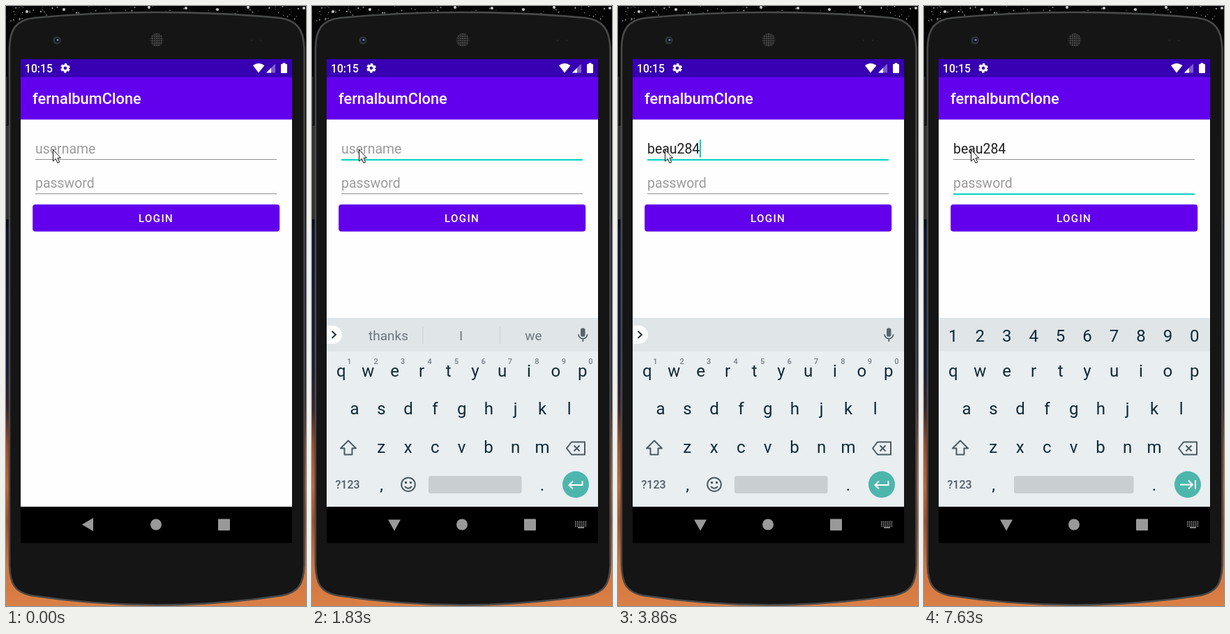
An HTML page that plays this animation: 430 px wide and 858 px high, repeating every 8 s.

```html
<!DOCTYPE html>
<html lang="en">
<head>
<meta charset="utf-8">
<title>Login screen</title>
<style>
  html, body { margin: 0; width: 100%; height: 100%; overflow: hidden; background: #000; }
  svg { display: block; width: 430px; height: 858px; font-family: Roboto, "Noto Sans", sans-serif; }
  text { white-space: pre; }
  .mid { text-anchor: middle; }
  .field { font-size: 19.46px; }
  .hint { fill: #9b9b9b; }
  .typed { fill: #1f1f1f; }
  .key { font-size: 24px; fill: #102a36; }
  .sup { font-size: 11px; font-weight: 500; fill: #75828a; }
  .pick { font-size: 19px; fill: #6a777e; }
  .pick.strong { font-weight: 700; fill: #000; }
  .line { fill: none; stroke: #4b5a62; stroke-width: 2; }
  .soft { fill: #999; }
  .off { display: none; }
</style>
</head>
<body>
<svg viewBox="0 0 430 858">
  <defs>
    <linearGradient id="sky" x2="0" y2="1">
      <stop offset="0" stop-color="#050506"/>
      <stop offset=".35" stop-color="#06070c"/>
      <stop offset=".38" stop-color="#0a1238"/>
      <stop offset=".6" stop-color="#141a3c"/>
      <stop offset=".67" stop-color="#3a2028"/>
      <stop offset=".73" stop-color="#a04a24"/>
      <stop offset=".8" stop-color="#c9642f"/>
      <stop offset=".86" stop-color="#a84c22"/>
      <stop offset=".93" stop-color="#d5733a"/>
      <stop offset="1" stop-color="#d98046"/>
    </linearGradient>
    <pattern id="mesh" width="3.2" height="3.2" patternUnits="userSpaceOnUse">
      <rect width="3.2" height="3.2" fill="#1b1b1b"/>
      <circle cx="1.6" cy="1.6" r="1.1" fill="#555"/>
    </pattern>
  </defs>

  <rect width="430" height="858" fill="url(#sky)"/>
  <g id="stars"></g>

  <!-- phone -->
  <path d="M0 171h4v134h-4z" fill="#303030"/>
  <path d="M0 101h2v69h-2z" fill="#242424"/>
  <path d="M5 60C5.500 34 14 20 40 17Q125 9 216 9T392 17C417 20 426.500 34 427.500 60V800C426.500 826 420 838 396 843Q306 856.500 216 856.500T36 843C12 838 6 826 5 800Z" fill="#151515" stroke="#484949" stroke-width="2.600"/>
  <circle cx="73" cy="49" r="5.500" fill="#38393d"/>
  <circle cx="73.500" cy="49" r="3.500" fill="#11131d"/>
  <circle cx="74" cy="48.500" r="1.600" fill="#7883a8"/>
  <circle cx="216" cy="48.500" r="9.500" fill="url(#mesh)"/>
  <path d="M351 48h2v2h-2zM364 48h2v2h-2z" fill="#242424"/>

  <!-- screen -->
  <rect x="21" y="76" width="389" height="692" fill="#fefefe"/>
  <rect x="21" y="101" width="389" height="61.400" fill="#6200ee"/>
  <rect x="21" y="76" width="389" height="25.700" fill="#3700b3"/>
  <text x="27" y="94.600" font-size="15.700" font-weight="500" fill="#fff">10:15</text>
  <g fill="none" stroke="#fff">
    <circle cx="85" cy="88.800" r="3.800" stroke-width="3"/>
    <circle cx="85" cy="88.800" r="5.700" stroke-width="2.200" stroke-dasharray="3.400 2.569" stroke-dashoffset="4.700"/>
  </g>
  <path d="M354 85Q362 79 370.500 85L362 95.500Z" fill="#fff"/>
  <path d="M386 82.500V95.500H373Z" fill="#7f5cce"/>
  <path d="M380 88.500V95.500H373Z" fill="#fff"/>
  <path d="M396.500 81.500h4v1.500h1.500q1 0 1 1v11q0 1-1 1h-7q-1 0-1-1v-11q0-1 1-1h1.500z" fill="#fff"/>
  <text x="38" y="140" font-size="21.800" font-weight="500" fill="#fff">fernalbumClone</text>

  <!-- form -->
  <text id="userHint" class="field hint" x="42" y="211">username</text>
  <text id="typed" class="field typed" x="42" y="211"></text>
  <rect id="spell" x="42" y="213" height="1" fill="#333"/>
  <rect id="caret" y="191" width="2" height="25.500" fill="#03cfbd"/>
  <rect id="userLine" x="42" y="219" width="346"/>
  <text class="field hint" x="42" y="260">password</text>
  <rect id="passLine" x="42" y="268" width="346"/>
  <rect x="38.200" y="283.700" width="354" height="38.900" rx="4" fill="#6200ee"/>
  <text x="190" y="308.600" font-size="15.100" font-weight="500" letter-spacing="1.350" fill="#fff">LOGIN</text>

  <!-- navigation bar -->
  <rect x="21" y="716" width="389" height="52" fill="#000"/>
  <path id="back" class="soft" d="M109 741.500L125 732V751Z"/>
  <g id="hide" class="soft">
    <path d="M109 734.500H127L118 750.500Z"/>
    <g id="hideKeys"></g>
    <path d="M381 745h9v1.700h-9z"/>
  </g>
  <circle class="soft" cx="215" cy="741.500" r="8"/>
  <rect class="soft" x="304" y="733.500" width="17" height="16.500" rx="1"/>

  <!-- keyboard -->
  <g id="board">
    <rect x="21" y="446" width="389" height="270" fill="#e9eef1"/>
    <rect x="21" y="446" width="389" height="48" fill="#e0e5e8"/>
    <g id="keys"></g>
    <g class="line">
      <path d="M52 621.500L41 632.500H46.500V641.500H57.500V632.500H63Z" stroke-linejoin="round"/>
      <path d="M372 623.500H391V641.500H372L365 632.500Z" stroke-linejoin="round"/>
      <path d="M375.500 628.500l8 8m0-8l-8 8"/>
    </g>
    <text x="33.500" y="690" font-size="16" font-weight="500" fill="#4f5d65">?123</text>
    <rect id="space" y="672" height="25" rx="3" fill="#c9ced1"/>
    <circle cx="378" cy="684.200" r="19" fill="#4db6ac"/>
    <g id="wordTools">
      <path d="M21 457H30A13 13 0 0 1 30 483H21Z" fill="#fff"/>
      <path class="line" d="M28.500 465l5.500 5-5.500 5" style="stroke:#263238"/>
      <rect x="385" y="460.500" width="6.500" height="12.500" rx="3.250" fill="#56646c"/>
      <path class="line" d="M382 469.500a6.300 6.300 0 0 0 12.600 0M388.300 476v4" style="stroke-width:1.700"/>
      <g id="supers"></g>
      <g class="line">
        <circle cx="138" cy="684.200" r="9.800"/>
        <path d="M133 687q5 5.500 10 0"/>
      </g>
      <path d="M133 680h3v3h-3zM140 680h3v3h-3z" fill="#4b5a62"/>
      <path class="line" d="M387.500 679v6H369M374 679.500l-5.500 5.500 5.500 5.500" style="stroke:#fff"/>
    </g>
    <g id="picks">
      <path id="bars" d="M158.500 458h1v25h-1zM269 458h1v25h-1z" fill="#cbd1d4"/>
      <text class="pick mid" x="109.500" y="478"></text>
      <text class="pick mid" x="213.700" y="478"></text>
      <text class="pick mid" x="317.500" y="478"></text>
    </g>
    <g id="digits">
      <path class="line" d="M367 684.500h17M379 678.500l6 6-6 6M389 678v13" style="stroke:#fff"/>
    </g>
  </g>

  <path d="M67.500 205.500V222L71.300 218.500 74 224.500 76.600 223.300 74 217.300H78.500Z" fill="#fff" stroke="#111"/>
</svg>
<script>
const LOOP = 8000, STEP = 38.45;
const $ = id => document.getElementById(id);

function add(parent, tag, attrs, text = '') {
  const el = document.createElementNS('http://www.w3.org/2000/svg', tag);
  for (const k in attrs) el.setAttribute(k, attrs[k]);
  el.textContent = text;
  return parent.appendChild(el);
}

function row(parent, chars, x, y, cls = 'key mid') {
  [...chars].forEach((c, i) => add(parent, 'text', { class: cls, x: x + i * STEP, y }, c));
}

row($('keys'), 'qwertyuiop', 41.8, 530);
row($('keys'), 'asdfghjkl', 61, 584);
row($('keys'), 'zxcvbnm', 99.3, 639);
row($('keys'), ',', 99.7, 693);
row($('keys'), '.', 330, 693);
row($('supers'), '1234567890', 53.3, 512, 'sup mid');
row($('digits'), '1234567890', 41.8, 479.5);

for (let i = 0; i < 18; i++)
  add($('hideKeys'), 'rect', { x: 377 + i % 6 * 2.9, y: 737 + Math.floor(i / 6) * 2.9, width: 1.7, height: 1.7 });

let seed = 7;
const rnd = () => (seed = seed * 16807 % 2147483647) / 2147483647;
const star = (cx, cy, r, fill) => add($('stars'), 'circle', { cx, cy, r, fill });
for (let i = 0; i < 150; i++) {
  const g = 50 + Math.floor(rnd() * 130);
  star(rnd() * 430, rnd() * 26, 0.4 + rnd() * 0.8, `rgb(${g},${g},${g})`);
}
for (const [x, y] of [[83, 5], [205, 2], [258, 3], [30, 8], [303, 5], [347, 2], [427, 3]]) star(x, y, 2.1, '#c4c4c4');

// Each cue changes only the listed parts of the state.
const cues = [
  [0, { text: '', caret: 0, focus: '', nav: 0, board: '', picks: ['thanks', 'I', 'we'], strong: 0, spell: 0, digits: 0 }],
  [410, { focus: 'user' }],
  [550, { caret: 1 }],
  [930, { caret: 0, nav: 1 }],
  [1180, { board: 'rising' }],
  [1300, { board: 'up', caret: 1 }],
  [1830, { caret: 0 }],
  [1980, { text: 'b', caret: 1, spell: 1, picks: ['be', 'but', 'because'], strong: 1 }],
  [2100, { text: 'be', picks: ['been', 'be', 'beautiful'] }],
  [2220, { text: 'bea', picks: ['bea', 'bear', 'bearing'] }],
  [2500, { text: 'beau', picks: ['beau', 'Beau', "Beau's"] }],
  [2900, { caret: 0 }],
  [3460, { text: 'beau2', caret: 1, picks: ['', 'beau2', ''], strong: 0 }],
  [3610, { text: 'beau28', picks: ['', 'beau28', ''] }],
  [3860, { text: 'beau284', picks: [], spell: 0 }],
  [4390, { caret: 0 }],
  [4790, { caret: 1 }],
  [5320, { caret: 0 }],
  [5850, { caret: 1 }],
  [6410, { caret: 0 }],
  [6840, { caret: 1 }],
  [7510, { caret: 0, focus: 'pass' }],
  [7630, { digits: 1 }]
];

const show = (id, on) => $(id).classList.toggle('off', !on);
const set = (id, attrs) => { for (const k in attrs) $(id).setAttribute(k, attrs[k]); };
const underline = (id, on) => set(id, on ? { height: 2, fill: '#03d3c0' } : { height: 1, fill: '#909090' });

function draw(s) {
  $('typed').textContent = s.text;
  const width = s.text ? $('typed').getComputedTextLength() : 0;
  set('caret', { x: 41.6 + width });
  set('spell', { width });
  show('caret', s.caret);
  show('spell', s.spell);
  show('userHint', !s.text);
  underline('userLine', s.focus === 'user');
  underline('passLine', s.focus === 'pass');

  show('back', !s.nav);
  show('hide', s.nav);
  show('board', s.board);
  const rising = s.board === 'rising';
  set('board', { transform: `translate(0 ${rising ? 3 : 0})`, opacity: rising ? 0.92 : 1 });

  document.querySelectorAll('.pick').forEach((el, i) => {
    el.textContent = s.picks[i] || '';
    el.classList.toggle('strong', i === 1 && !!s.strong);
  });
  show('bars', s.picks[0]);
  show('picks', !s.digits);
  show('wordTools', !s.digits);
  show('digits', s.digits);
  const x = s.digits ? 129 : 167;
  set('space', { x, width: 300.5 - x });
}

const start = performance.now();
let shown = 0;
function tick() {
  const t = (performance.now() - start) % LOOP;
  const past = cues.filter(c => c[0] <= t);
  if (past.length !== shown) {
    shown = past.length;
    draw(Object.assign({}, ...past.map(c => c[1])));
  }
  requestAnimationFrame(tick);
}
tick();
</script>
</body>
</html>
```
